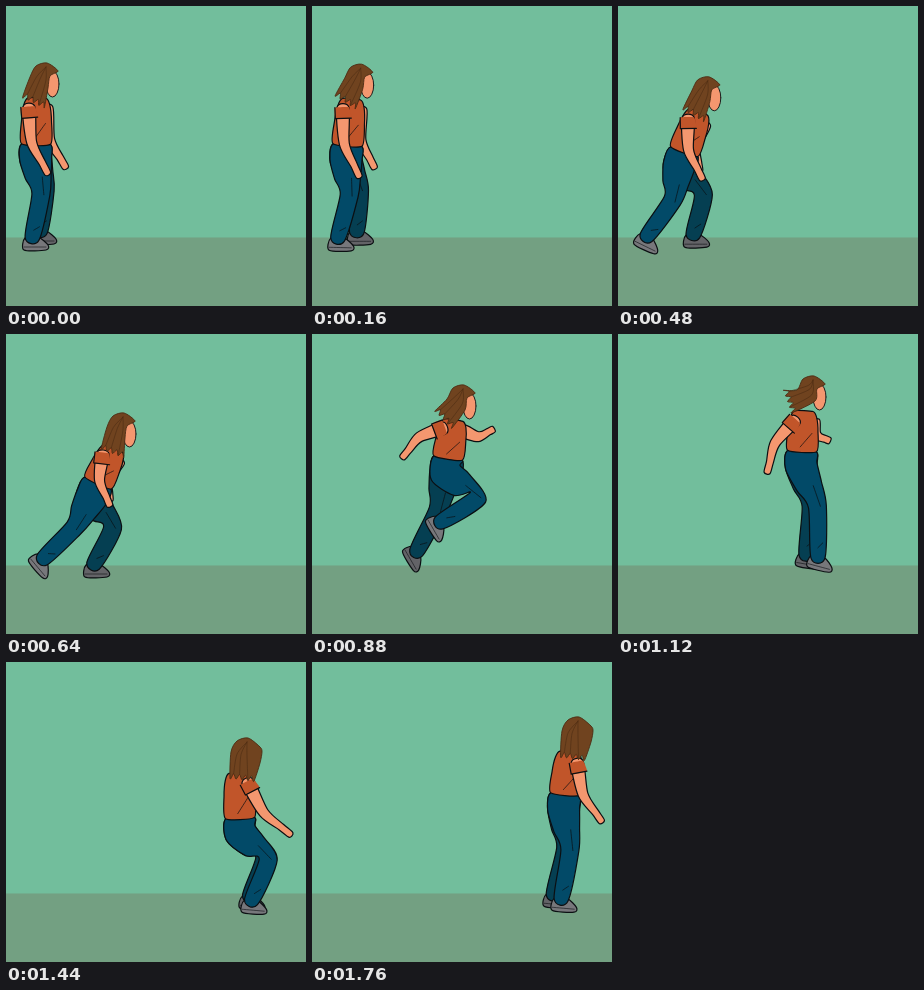
These frames come from a looping animation (300x300 px, 1.84 s). An HTML page with a canvas:

```html
<!DOCTYPE html>
<html lang="en">
<head>
<meta charset="utf-8">
<title>Running leap</title>
<style>
html, body { margin: 0; width: 100%; height: 100%; overflow: hidden; background: #72be9c; }
canvas { display: block; width: 100vw; height: 100vh; }
</style>
</head>
<body>
<canvas id="stage" width="300" height="300"></canvas>
<script>
const ctx = document.getElementById('stage').getContext('2d');
const LOOP = 1840, STEP = 80;
const INK = '#0b0f12', SKIN = '#f4976f', SHIRT = '#c1552a', HAIR = '#70431f', HAIR_INK = '#4c2c14';
const NEAR = { jeans: '#024a68', shoe: '#77777b', reach: 48 };
const FAR = { jeans: '#053f52', shoe: '#636367', reach: 45 };

// Key poses. Feet are [x, y, pitch], lift is the swing of the hair; pitch and lift in degrees.
const poses = [
  { time: 0, head: [38, 74], hip: [30, 138], lift: [25], hand: [42, 168], farHand: [60, 162],
    foot: [26, 233, 0], farFoot: [34, 227, 0] },
  { time: 320, head: [64, 78], hip: [47, 141], lift: [40], hand: [59, 174], farHand: [69, 163],
    foot: [25, 234, 5], farFoot: [62, 228, 0] },
  { time: 640, head: [115, 96], hip: [92, 149], lift: [20], hand: [104, 172], farHand: [104, 167],
    foot: [36, 226, 50], farFoot: [87, 232, 0] },
  { time: 880, head: [149, 68], hip: [136, 124], lift: [45], hand: [90, 124], farHand: [182, 95],
    foot: [127, 189, 60], farFoot: [104, 219, 60] },
  { time: 1120, head: [193, 59], hip: [184, 117], lift: [70], hand: [149, 139], farHand: [212, 107],
    foot: [200, 224, 15], farFoot: [188, 222, 10] },
  { time: 1440, head: [239, 93], hip: [234, 156], lift: [7], hand: [285, 173], farHand: [234, 150],
    foot: [245, 240, 5], farFoot: [243, 236, 5] },
  { time: 1760, head: [264, 72], hip: [253, 132], lift: [8], hand: [290, 160], farHand: [253, 126],
    foot: [249, 238, 5], farFoot: [241, 234, 5] }
];
const times = poses.map(pose => pose.time);

// Monotone cubic through the key values: smooth, without overshoot.
function tween(values, k, time) {
  const slope = i => (values[i + 1] - values[i]) / (times[i + 1] - times[i]);
  const tangent = i => {
    if (i === 0 || i === values.length - 1) return 0;
    const a = slope(i - 1), b = slope(i);
    return a * b > 0 ? 2 * a * b / (a + b) : 0;
  };
  const span = times[k + 1] - times[k], u = (time - times[k]) / span, v = 1 - u;
  return v * v * (1 + 2 * u) * values[k] + u * u * (3 - 2 * u) * values[k + 1]
    + u * v * span * (v * tangent(k) - u * tangent(k + 1));
}

function poseAt(time) {
  let k = 0;
  while (k < times.length - 2 && time >= times[k + 1]) k++;
  const pose = {};
  for (const key of Object.keys(poses[0]).filter(name => name !== 'time'))
    pose[key] = poses[0][key].map((_, i) => tween(poses.map(p => p[key][i]), k, time));
  return pose;
}

const add = (p, d, s = 1) => [p[0] + d[0] * s, p[1] + d[1] * s];
const mix = (a, b, t) => [a[0] + (b[0] - a[0]) * t, a[1] + (b[1] - a[1]) * t];
const distance = (a, b) => Math.hypot(b[0] - a[0], b[1] - a[1]);
const direction = (a, b) => {
  const d = distance(a, b) || 1;
  return [(b[0] - a[0]) / d, (b[1] - a[1]) / d];
};
const front = d => [d[1], -d[0]]; // the side she faces, for a bone pointing down

function trace(points, closed, tension = 0.14) {
  const n = points.length;
  const at = i => closed ? points[(i + n) % n] : points[Math.max(0, Math.min(n - 1, i))];
  ctx.beginPath();
  ctx.moveTo(...points[0]);
  for (let i = 0; i < (closed ? n : n - 1); i++) {
    const [p, a, b, q] = [at(i - 1), at(i), at(i + 1), at(i + 2)];
    ctx.bezierCurveTo(a[0] + (b[0] - p[0]) * tension, a[1] + (b[1] - p[1]) * tension,
      b[0] - (q[0] - a[0]) * tension, b[1] - (q[1] - a[1]) * tension, ...b);
  }
}

function stroke(color, width) {
  ctx.strokeStyle = color;
  ctx.lineWidth = width;
  ctx.stroke();
}

function shape(points, fill, ink = INK, width = 1.2, tension) {
  trace(points, true, tension);
  ctx.fillStyle = fill;
  ctx.fill();
  stroke(ink, width);
}

function line(points, color = INK, width = 0.7) {
  trace(points, false);
  stroke(color, width);
}

// Outline around a chain of joints, with a half width at each joint.
function limb(joints, halfWidths, fill) {
  const side = sign => joints.map((joint, i) => {
    const before = joints[Math.max(0, i - 1)], after = joints[Math.min(joints.length - 1, i + 1)];
    return add(joint, front(direction(before, after)), sign * halfWidths[i]);
  });
  shape([...side(1), ...side(-1).reverse()], fill);
}

function arm(shoulder, hand) {
  const elbow = add(mix(shoulder, hand, 0.5), front(direction(shoulder, hand)), -7);
  limb([shoulder, elbow, mix(elbow, hand, 0.65), hand], [6, 5, 3.5, 3], SKIN);
  return elbow;
}

function sleeve(shoulder, elbow) {
  const down = direction(shoulder, elbow), across = front(down), hem = add(shoulder, down, 11);
  const edge = [add(shoulder, across, -8), add(hem, across, -8), add(hem, across, 8)];
  trace([...edge, add(shoulder, across, 6)], true, 0.05);
  ctx.fillStyle = SHIRT;
  ctx.fill();
  trace(edge, false, 0);
  stroke(INK, 1.2);
}

function shoe([x, y, pitch], fill) {
  const c = Math.cos(pitch * Math.PI / 180), s = Math.sin(pitch * Math.PI / 180);
  const place = ([u, v]) => [x + u * c - v * s, y + u * s + v * c];
  shape([[-7, -1], [6, -2], [16, 6], [14, 11], [-8, 11]].map(place), fill);
  line([[-8, 8], [14, 8]].map(place), INK, 0.6);
}

function leg(hip, axis, foot, look) {
  const down = direction(hip, foot), half = distance(hip, foot) / 2;
  const bend = Math.sqrt(Math.max(49, look.reach ** 2 - half ** 2));
  const knee = add(mix(hip, foot, 0.53), front(down), bend);
  const seat = add(hip, axis, 15), thigh = mix(seat, knee, 0.5);
  shoe(foot, look.shoe);
  limb([hip, seat, thigh, knee, foot], [14, 16, 13, 9, 7], look.jeans);
  line([add(thigh, front(down), 4), add(knee, front(down), 3)]);
  line([mix(knee, foot, 0.8), add(mix(knee, foot, 0.72), front(down), 5)]);
}

function torso(neck, hip) {
  const across = front(direction(neck, hip));
  const rows = [[0, 9], [0.15, 13], [0.5, 15], [1, 14.5]];
  const side = sign => rows.map(([t, w]) => add(mix(neck, hip, t), across, sign * w));
  shape([...side(1), ...side(-1).reverse()], SHIRT, INK, 1.2, 0.1);
  line([add(mix(neck, hip, 0.55), across, 9), add(mix(neck, hip, 0.9), across, -2)]);
}

function head(center, lift, turn) {
  const angle = lift * Math.PI / 180, fall = [-Math.sin(angle), Math.cos(angle)];
  const across = front(fall), tail = add(center, fall, 22);
  ctx.beginPath();
  ctx.ellipse(center[0] + 4 + 4.5 * turn, center[1] + 4, 6.5, 13, 0, 0, 2 * Math.PI);
  ctx.fillStyle = SKIN;
  ctx.fill();
  stroke(INK, 0.9);

  const fringe = Array.from({ length: 9 }, (_, i) =>
    add(add(tail, across, (i - 4) * 3), fall, i % 2 ? -2 : 3));
  const parting = 15 - 11 * turn;
  const outline = [[14, -9], [3, -17], [-8, -14], [-14, -3]].map(p => add(center, p));
  const edge = [[parting, 8], [parting + 2, -4]].map(p => add(center, p));
  shape([...outline, ...fringe, ...edge], HAIR, HAIR_INK, 0.9);
  for (const i of [1, 3, 6])
    line([add(center, [2, -13]), add(center, across, (i - 5) * 2), fringe[i]], HAIR_INK, 0.6);
}

function draw(time) {
  const pose = poseAt(time);
  const u = Math.max(0, Math.min(1, (time - 1120) / 320));
  const turn = 1 - u * u * (3 - 2 * u); // 1 in profile, 0 facing away
  const neck = add(pose.head, [-7, 18]), axis = direction(neck, pose.hip);
  const shoulderAt = offset => add(add(neck, axis, 9), front(axis), offset);
  const shoulder = shoulderAt(9 - 17 * turn);

  ctx.fillStyle = '#72be9c';
  ctx.fillRect(0, 0, 300, 300);
  ctx.fillStyle = '#73a082';
  ctx.fillRect(0, 231.5, 300, 68.5);
  ctx.lineCap = ctx.lineJoin = 'round';

  arm(shoulderAt(10 * turn), pose.farHand);
  leg(pose.hip, axis, pose.farFoot, FAR);
  leg(pose.hip, axis, pose.foot, NEAR);
  torso(neck, pose.hip);
  sleeve(shoulder, arm(shoulder, pose.hand));
  head(pose.head, pose.lift[0], turn);
}

function tick() {
  const time = performance.now() % LOOP;
  draw(Math.floor(time / STEP) * STEP);
  requestAnimationFrame(tick);
}
tick();
</script>
</body>
</html>
```
